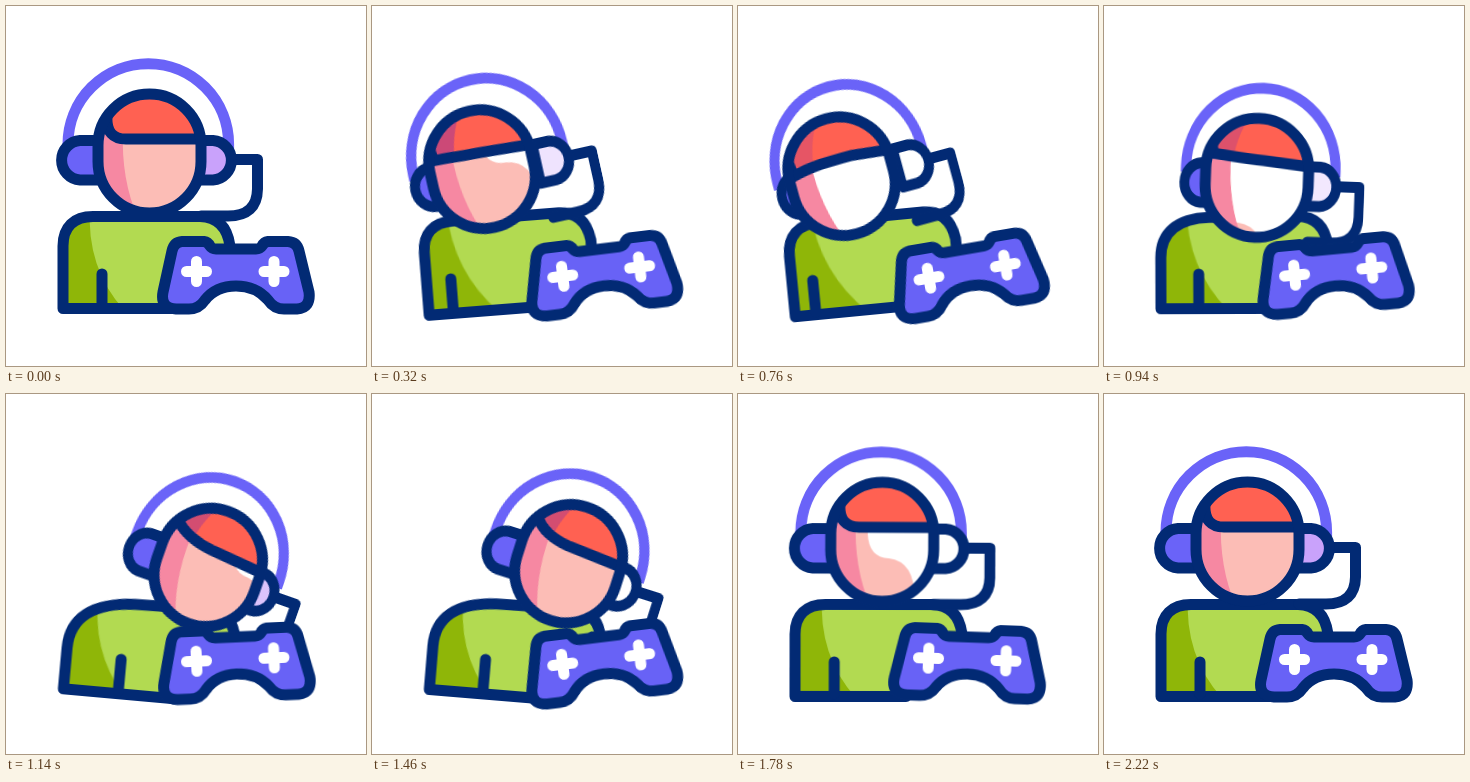
An HTML page that plays this animation: 360 by 360 pixels, repeating every 2400 ms.

```html
<!DOCTYPE html>
<html lang="en">
<head>
<meta charset="utf-8">
<title>Gamer</title>
<style>
  html, body { margin: 0; width: 100%; height: 100%; overflow: hidden; background: #fff; }
  svg { display: block; width: 100vw; height: 100vh; }
  .line { stroke: #022a74; stroke-width: 11; stroke-linecap: round; stroke-linejoin: round; fill: none; }

  .anim, .torso, .hair { animation: 2400ms cubic-bezier(.37, 0, .63, 1) infinite; }
  .torso { animation-name: torso; }
  .hair { animation-name: hair; }
  #body { animation-name: body; transform-origin: 143px 303px; }
  #arm { animation-name: arm; }
  #shade { animation-name: shade; transform-origin: 84px 216px; }
  #head { animation-name: head; transform-origin: 143.5px 147.5px; }
  #phones { animation-name: phones; transform-origin: 143.5px 147.5px; }
  #band { animation-name: band; transform-origin: 142.3px 138px; }
  #pad { animation-name: pad; transform-origin: 230px 266px; }
  #glare { animation-name: glare; }
  #earGlare { animation-name: earGlare; }
  #hairShade { animation-name: hairShade; }

  /* lean left, lean right, back to rest */
  @keyframes body {
    0%, 75.6%, 100% { transform: rotate(0deg); }
    21.3%, 27.8% { transform: rotate(-6.4deg); }
    50%, 56% { transform: rotate(5.5deg); }
  }
  @keyframes torso {
    0%, 27.8%, 75.6%, 100% { d: path("M57 302.5V240C57 221 68 210.5 87 210.5L194 210.5Q220 211 224 240V256L192 272L168 302.5Z"); }
    50%, 56% { d: path("M57 302.5V262C57 232 78 214 122 212L194 210.5Q220 211 224 240V256L192 272L168 302.5Z"); }
  }
  @keyframes arm {
    0%, 75.6%, 100% { transform: translateX(0); }
    21.3%, 27.8% { transform: translateX(-21px); }
    50%, 56% { transform: translateX(17px); }
  }
  @keyframes shade {
    0%, 50%, 100% { transform: skewX(0deg); }
    21.3%, 27.8% { transform: skewX(8deg); }
  }
  @keyframes head {
    0%, 75.6%, 100% { transform: translate(0, 0) rotate(0deg); }
    21.3%, 27.8% { transform: translate(-48px, 22.5px) rotate(-18deg); }
    50%, 56% { transform: translate(62px, 26px) rotate(20.5deg); }
  }
  @keyframes phones {
    0%, 75.6%, 100% { transform: translateX(0) scaleX(1); }
    21.3%, 27.8% { transform: translateX(16.5px) scaleX(.89); }
    50%, 56% { transform: translateX(-3px) scaleX(.9); }
  }
  @keyframes band {
    0%, 75.6%, 100% { transform: translateX(0) scaleX(1); }
    21.3%, 27.8% { transform: translateX(-4px) scaleX(1.04); }
    50%, 56% { transform: translateX(0) scaleX(1.04); }
  }
  @keyframes hair {
    0%, 75.6%, 100% { d: path("M90 70L101 110C100 126 107 133 120 133L204 133V70Z"); }
    21.3%, 27.8% { d: path("M90 70L97 137C118 130 140 130 160 130L204 135V70Z"); }
    50%, 56% { d: path("M90 70L101 113C108 122 124 128 140 130L204 136V70Z"); }
  }
  @keyframes pad {
    0%, 88%, 100% { transform: rotate(0deg); }
    22.2%, 27.8% { transform: rotate(-10.5deg); }
    47% { transform: rotate(-2.5deg); }
    60.5% { transform: rotate(-7deg); }
    74% { transform: rotate(2deg); }
  }
  @keyframes glare {
    0%, 54%, 62%, 92%, 100% { transform: translate(48px, -48px); }
    13.3% { transform: translate(18px, -18px); }
    27%, 33% { transform: translate(-60px, 60px); }
    47.5% { transform: translate(34px, -20px); }
    74% { transform: translate(0, 0); }
  }
  @keyframes earGlare {
    0%, 92%, 100% { opacity: 0; }
    13.3% { opacity: .7; }
    24%, 33% { opacity: 1; }
    47.5% { opacity: .35; }
    60%, 74% { opacity: 1; }
  }
  @keyframes hairShade {
    0%, 74%, 100% { opacity: 0; }
    13.3% { opacity: 1; }
    31.7% { opacity: .5; }
    47.5%, 61% { opacity: .85; }
  }
</style>
</head>
<body>
<svg viewBox="0 0 360 360">
  <defs>
    <path id="skull" d="M92 139.5A51.5 51.5 0 0 1 195 139.5V155.5A51.5 51.5 0 0 1 92 155.5Z"/>
    <path id="light" d="M117 125Q115 174 132 212H200V125Z"/>
    <path id="earR" d="M190 134.5H207A19.8 19.8 0 0 1 207 174H190Z"/>
    <path id="plus" d="M-10 0H10M0-10V10" stroke="#fff" stroke-width="11" stroke-linecap="round"/>
    <clipPath id="inSkull"><use href="#skull"/></clipPath>
    <clipPath id="inLight"><use href="#light"/></clipPath>
    <clipPath id="inTorso"><path class="torso"/></clipPath>
    <clipPath id="inHair"><path class="hair"/></clipPath>
  </defs>

  <g id="body" class="anim">
    <path class="torso" fill="#b2da51"/>
    <g clip-path="url(#inTorso)">
      <path id="shade" class="anim" d="M20 200H84Q80 262 118 304H20Z" fill="#8fb608"/>
    </g>
    <path class="torso line"/>
    <g id="arm" class="anim"><path class="line" d="M96 268V300"/></g>
  </g>

  <g id="head" class="anim">
    <g id="phones" class="anim">
      <path id="band" class="anim" d="M62 144V138A80.3 80.3 0 0 1 222.6 138V144" fill="none" stroke="#6a63f8" stroke-width="11"/>
      <path class="line" d="M228 153.5H251.5V183Q251 210 222 210H195"/>
      <path class="line" style="fill:#6a63f8" d="M97 134.5H74A19.8 19.8 0 0 0 74 174H97Z"/>
      <use href="#earR" fill="#c9a2fb"/>
      <use href="#earR" id="earGlare" class="anim" fill="#fff"/>
      <use href="#earR" class="line"/>
    </g>
    <g clip-path="url(#inSkull)">
      <use href="#skull" fill="#f688a2"/>
      <use href="#light" fill="#fcbdb6"/>
      <g clip-path="url(#inLight)">
        <path id="glare" class="anim" fill="#fff" d="M129 0V140Q130 163 150 164Q176 167 176 204H340V0Z"/>
      </g>
      <path class="hair" fill="#ff6152"/>
      <g clip-path="url(#inHair)">
        <path id="hairShade" class="anim" d="M88 80V140H118Q120 108 136 84Z" fill="#cc4a78"/>
      </g>
      <path class="hair line"/>
    </g>
    <use href="#skull" class="line"/>
  </g>

  <g id="pad" class="anim">
    <path class="line" style="fill:#6862f6" d="M176 235.5H198Q202 236 204 240Q206 243 210 243H250Q254 243 256 240Q258 236 262 235.5H282Q291 236 293 245L303 286Q305 302 291 303H278Q268 303 262 294Q250 280 230 280Q210 280 199 294Q193 303 183 303H170Q154 302 157 286L166 245Q168 236 176 235.5Z"/>
    <use href="#plus" x="190.500" y="265.500"/>
    <use href="#plus" x="268" y="265.500"/>
  </g>
</svg>
</body>
</html>
```
